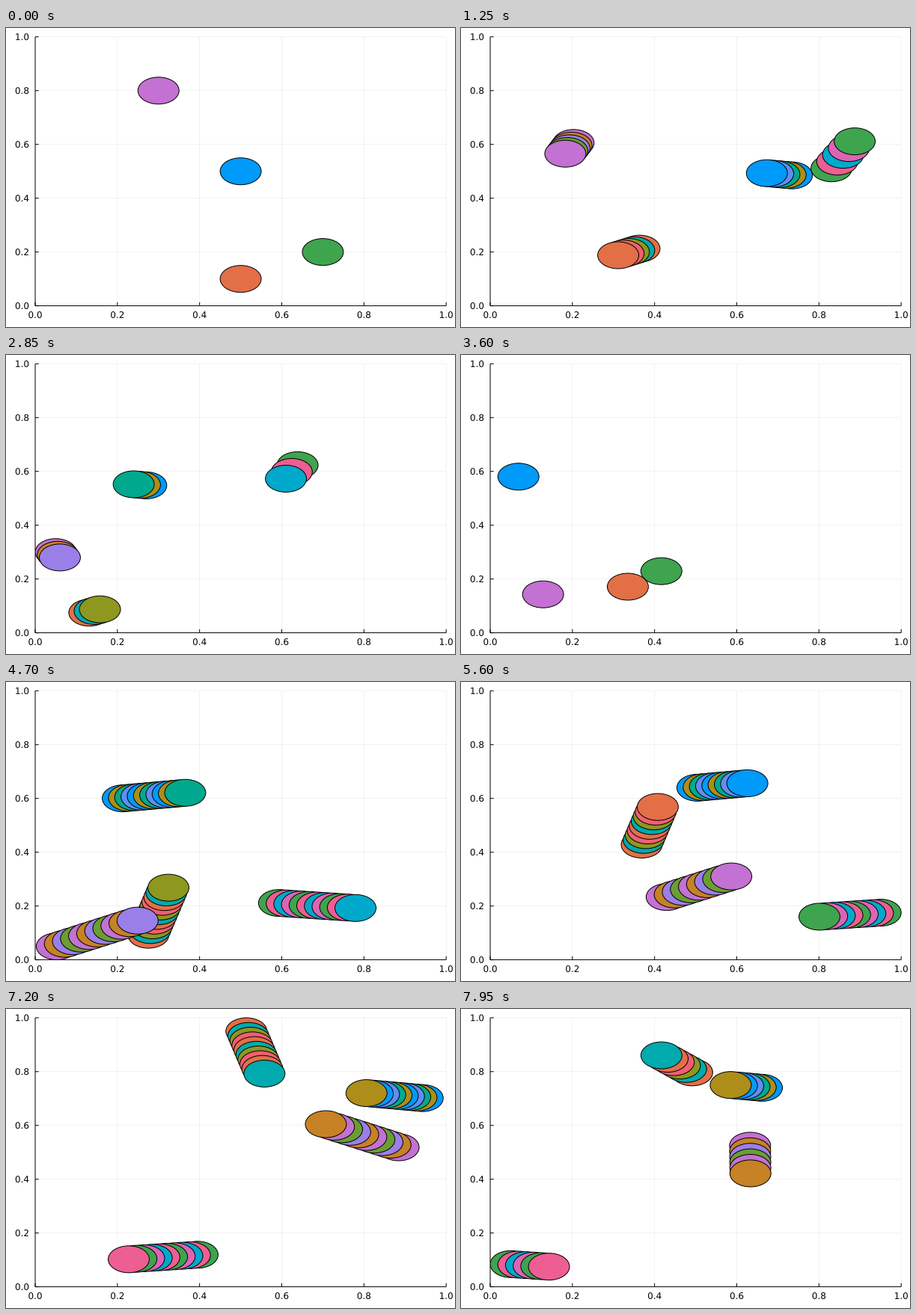
A matplotlib script for the animation above (8 s loop, 600x400 px).

```python
import itertools
import math

import matplotlib.pyplot as plt
import numpy as np
from matplotlib.animation import FuncAnimation
from matplotlib.collections import EllipseCollection
from matplotlib.patches import PathPatch, Rectangle
from matplotlib.textpath import TextPath

# Hard discs in a unit box, moved from one collision to the next.
N_FRAMES, INTERVAL = 160, 50
DT = 0.01
R = 0.05

# Plot area in pixels, measured from the lower left corner of the stage.
X0, Y0, W, H = 39.03, 28.39, 549.16, 359.80
PX = 0.72  # one pixel in points at 100 dpi
FONT_PX = 12
TICK = 4.72

PALETTE = [
    "#009AFA", "#E36F47", "#3EA44E", "#C371D2",
    "#AC8E18", "#00AAAE", "#ED5E93", "#C68225",
    "#00A98D", "#8E971E", "#00A9CC", "#9B7FE9",
    "#618DF6", "#F05F73", "#DD64B5", "#6B9E32",
]


def wall_time(x, v):
    if v > 0:
        return (1 - R - x) / v
    if v < 0:
        return (x - R) / -v
    return math.inf


def pair_time(dp, dv):
    a, b, c = dv @ dv, dp @ dv, dp @ dp - 4 * R * R
    disc = b * b - a * c
    if b >= 0 or disc <= 0:
        return math.inf
    return -(b + math.sqrt(disc)) / a


def next_event(pos, vel):
    walls = [(wall_time(pos[k, i], vel[k, i]), "wall", k, i)
             for k in range(4) for i in range(2)]
    pairs = [(pair_time(pos[k] - pos[j], vel[k] - vel[j]), "pair", j, k)
             for j, k in itertools.combinations(range(4), 2)]
    return min(walls + pairs, key=lambda e: e[0])


def simulate():
    """Return one stack of disc centres per frame; trails restart at events."""
    pos = np.array([[0.5, 0.5], [0.5, 0.1], [0.7, 0.2], [0.3, 0.8]])
    vel = np.array([[0.5, -1.5], [0.0, 2.0], [1.9, 1.6], [-0.5, -1.0]])
    frames = []
    while len(frames) < N_FRAMES:
        t, kind, a, b = next_event(pos, vel)
        trail = []
        for i in range(int(t / DT) + 1):
            trail.append(pos + vel * (i * DT))
            frames.append(np.concatenate(trail))
        pos = pos + vel * t
        if kind == "wall":
            vel[a, b] *= -1
        else:
            n = pos[b] - pos[a]
            n /= np.linalg.norm(n)
            push = ((vel[b] - vel[a]) @ n) * n
            vel[a] += push
            vel[b] -= push
    return frames[:N_FRAMES]


def to_px(p):
    return np.column_stack([X0 + W * p[:, 0], Y0 + H * p[:, 1]])


def line(x1, y1, x2, y2, width=1.0, alpha=1.0):
    ax.plot([x1, x2], [y1, y2], color="black", lw=width * PX, alpha=alpha,
            solid_capstyle="butt", snap=False, zorder=1)


def label(x, y, s):
    path = TextPath((x, y), s, size=FONT_PX, prop={"family": "DejaVu Sans"})
    ax.add_patch(PathPatch(path, facecolor="black", lw=0, zorder=1))


def draw_axes():
    text_w = 1.59 * FONT_PX  # advance of two digits and a point
    for v in np.linspace(0, 1, 6):
        x, y = X0 + W * v, Y0 + H * v
        line(x, Y0, x, Y0 + H, 0.5, 0.1)
        line(X0, y, X0 + W, y, 0.5, 0.1)
        line(x, Y0, x, Y0 + TICK)
        line(X0, y, X0 + TICK, y)
        s = f"{v:.1f}"
        label(x - text_w / 2, 12.02, s)
        label(31 - text_w, y - 4.32, s)
    line(X0, Y0, X0 + W, Y0)
    line(X0, Y0, X0, Y0 + H)


FRAMES = simulate()

fig = plt.figure(figsize=(6, 4), dpi=100, facecolor="white")
ax = fig.add_axes([0, 0, 1, 1])
ax.set_axis_off()
draw_axes()
ax.set_xlim(0, 600)
ax.set_ylim(0, 400)

discs = EllipseCollection(
    [2 * R * W], [2 * R * H], [0], units="xy",
    offsets=to_px(FRAMES[0]), offset_transform=ax.transData,
    facecolors=PALETTE, edgecolors="black", linewidths=PX, zorder=3)
ax.add_collection(discs, autolim=False)
discs.set_clip_path(Rectangle((39, 28), 550, 361, transform=ax.transData))


def update(i):
    discs.set_offsets(to_px(FRAMES[i]))
    return [discs]


anim = FuncAnimation(fig, update, frames=N_FRAMES, interval=INTERVAL,
                     repeat=True, repeat_delay=0, blit=False)
plt.show()
```
